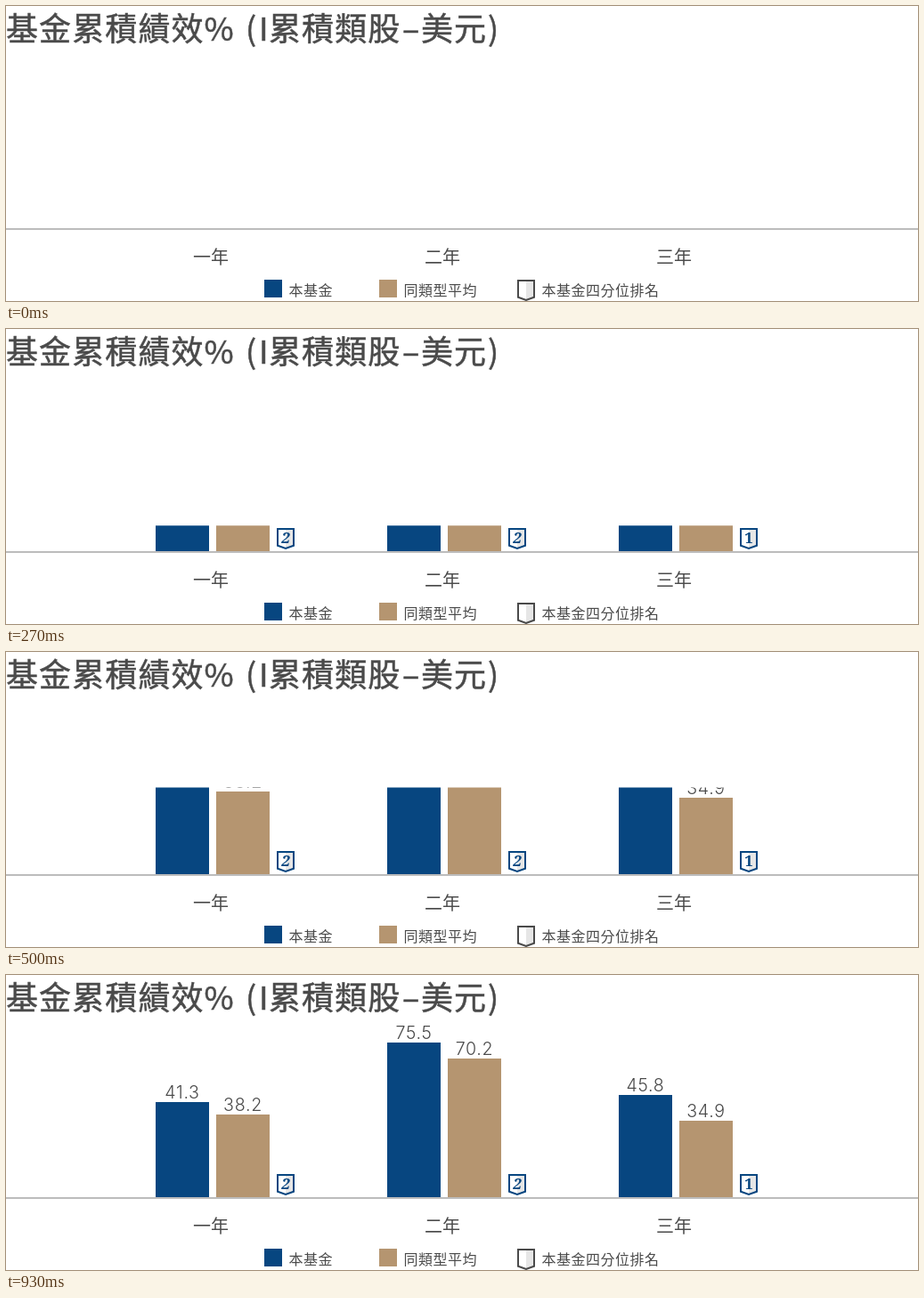
Animation of 1024x332 px, one loop 1030 ms. Source, as an HTML page:

```html
<!DOCTYPE html>
<html lang="zh-Hant">
<head>
<meta charset="utf-8">
<style>
  html, body { margin: 0; width: 100%; height: 100%; overflow: hidden; background: #fff; }
  svg { display: block; }
  text { font-family: "Noto Sans CJK TC", "Noto Sans CJK", sans-serif; fill: #4a4a4a; }
  .title { font-size: 36px; letter-spacing: 1.1px; stroke: #4a4a4a; stroke-width: .5px; }
  .axis { font-size: 20px; }
  .legend { font-size: 16px; letter-spacing: .5px; }
  .value { font: 350 19.6px Inter, "Liberation Sans", sans-serif; letter-spacing: .7px; text-anchor: middle; }
  .rank { font: 900 17px "Noto Serif", serif; fill: #074680; text-anchor: middle; }
  .slanted { font-style: italic; }
</style>
</head>
<body>
<svg width="1024" height="332" viewBox="0 0 1024 332">
  <defs>
    <clipPath id="clip"><rect id="window" width="1024"/></clipPath>
    <g id="badge">
      <path d="M1 1H19V19.7L10 23 1 19.7Z" fill="#fff"/>
      <path d="M10 1H19V19.7L10 23Z" fill="#e6e6e6"/>
      <path d="M1 1H19V19.7L10 23 1 19.7Z" fill="none" stroke="currentColor" stroke-width="2"/>
    </g>
  </defs>
  <text class="title" y="39"><tspan x="0">基金累積績效%</tspan><tspan x="269">(</tspan><tspan x="284">I</tspan><tspan x="295">累積類股</tspan><tspan x="445">–</tspan><tspan x="466">美元</tspan><tspan x="541">)</tspan></text>
  <g id="chart" clip-path="url(#clip)"></g>
  <path d="M0 251H1024" stroke="#bcbcbc" stroke-width="2"/>
  <g class="axis">
    <text x="210" y="290">一年</text>
    <text x="470" y="290">二年</text>
    <text x="730" y="290">三年</text>
  </g>
  <g class="legend">
    <rect x="290" y="308" width="20" height="20" fill="#074680"/>
    <text x="317.5" y="326">本基金</text>
    <rect x="419" y="308" width="20" height="20" fill="#b59570"/>
    <text x="446.5" y="326">同類型平均</text>
    <use href="#badge" x="574" y="308" color="#4a4a4a"/>
    <text x="601.5" y="326">本基金四分位排名</text>
  </g>
</svg>
<script>
const BASE = 250, RISE = 195, LOOP = 1030, STEPS = 30;
const BLUE = '#074680', TAN = '#b59570';

const groups = [
  { x: 168, fund: ['41.3', 143], peers: ['38.2', 157], rank: 2 },
  { x: 428, fund: ['75.5', 76], peers: ['70.2', 94], rank: 2 },
  { x: 688, fund: ['45.8', 135], peers: ['34.9', 164], rank: 1 },
];

const bar = (x, [label, top], color) =>
  `<rect x="${x}" y="${top}" width="60" height="${BASE - top}" fill="${color}"/>
   <text class="value" x="${x + 30}" y="${top - 4}">${label}</text>`;

const badge = (x, rank) =>
  `<use href="#badge" x="${x}" y="224" color="${BLUE}"/>
   <text class="rank ${rank === 2 ? 'slanted' : ''}" x="${x + 10}" y="241">${rank}</text>`;

document.getElementById('chart').innerHTML = groups.map(g =>
  bar(g.x, g.fund, BLUE) + bar(g.x + 68, g.peers, TAN) + badge(g.x + 136, g.rank)).join('');

// cubic-bezier(.42, 0, .58, 1), solved by bisection
function easeInOut(x) {
  let lo = 0, hi = 1, s;
  for (let i = 0; i < 30; i++) {
    s = (lo + hi) / 2;
    if (1.26 * s - .78 * s * s + .52 * s ** 3 < x) lo = s; else hi = s;
  }
  return s * s * (3 - 2 * s);
}

const reveal = document.getElementById('window');

function draw() {
  const t = performance.now() % LOOP;
  // 30 steps per second, each starting on a multiple of 10 ms
  const step = Math.min(28, Math.floor((Math.floor(t / 10) + .34) * .3));
  const height = RISE * easeInOut(step / STEPS);
  reveal.setAttribute('y', BASE - height);
  reveal.setAttribute('height', height);
  requestAnimationFrame(draw);
}
draw();
</script>
</body>
</html>
```
